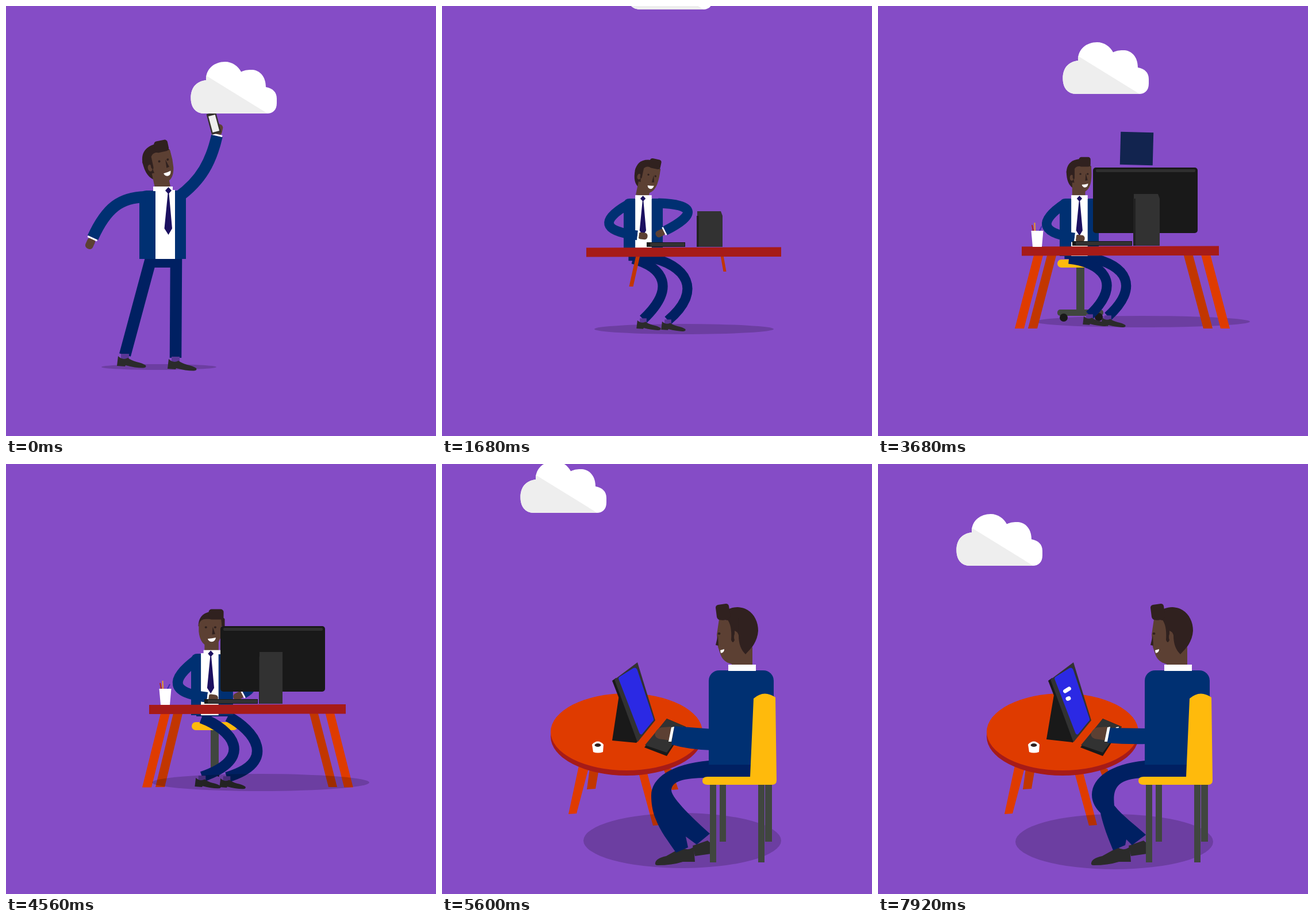
Recreate the animation shown at these times as an HTML page. Size 748 px wide and 748 px high, loop 8000 ms.

```html
<!DOCTYPE html>
<html lang="en">
<head>
<meta charset="utf-8">
<title>Work anywhere</title>
<style>
html, body { margin: 0; height: 100%; overflow: hidden; background: #854cc6; }
svg { display: block; width: 100vw; height: 100vh; }
.coat { fill: #003072; }
.trouser { fill: #002062; }
.skin { fill: #5c4033; }
.hair { fill: #30211f; }
.white { fill: #fff; }
.tie { fill: #1b1060; }
.shoe { fill: #2b2b2b; }
.sock { fill: #5a3797; }
.arm { fill: none; stroke: #003072; }
.leg { fill: none; stroke: #002062; }
.shade { fill: #000; fill-opacity: .19; }
.orange { fill: #df3b00; }
.rust { fill: #c23600; }
.red { fill: #a61b18; }
.yellow { fill: #ffba0c; }
.metal { fill: #40463f; }
.ink { fill: #191919; }
.dark { fill: #323232; }
</style>
</head>
<body>
<svg viewBox="0 0 748 748">
  <defs>
    <g id="shoe">
      <rect class="sock" x="-7" y="-2" width="14" height="11"/>
      <path class="shoe" d="M-12,2L-14,19L0,20L1,18Q20,23 32,22.500Q38,22 36,18Q30,14 20,12Q10,9 5,5Q-4,10 -12,2Z"/>
    </g>
    <g id="hand">
      <rect class="skin" x="1" y="-7" width="20" height="14" rx="6"/>
      <rect class="white" x="0" y="-9" width="3" height="18"/>
    </g>
  </defs>

  <ellipse id="shadeBack" class="shade"/>

  <g id="stool">
    <rect class="metal" x="33" y="10" width="14" height="80"/>
    <g id="stoolBase">
      <rect class="metal" x="-40" y="0" width="80" height="11" rx="5"/>
      <circle class="ink" cx="-29" cy="14" r="7"/>
      <circle class="ink" cx="32" cy="13" r="7"/>
    </g>
    <rect class="yellow" width="80" height="14" rx="7"/>
  </g>

  <g id="front">
    <path id="legR" class="leg"/><use id="shoeR" href="#shoe"/>
    <path id="legL" class="leg"/><use id="shoeL" href="#shoe"/>
    <g id="head">
      <path id="nape" class="hair" d="M-26,-46C-26,-25 -20,-16 -13,-11L2,-18V-46Z"/>
      <path class="hair" d="M-26,-42C-26,-58 -18,-70 4,-71H12L25,-56V-42Z"/>
      <rect class="skin" x="-14" y="-22" width="27" height="28"/>
      <g id="face">
        <path class="skin" d="M-11,-46Q-8,-57 2,-56H25Q27,-40 25,-25Q22,-6 9,-2Q-9,-4 -11,-32Z"/>
        <g id="ear">
          <ellipse class="skin" cx="-15" cy="-32" rx="4" ry="6"/>
          <path class="hair" d="M-13,-50h4v18q-1,6 -4,0z"/>
        </g>
        <g id="features">
          <path class="hair" d="M14,-41L13,-26L18,-27Z"/>
          <circle class="hair" cx="3" cy="-40" r="2"/>
          <circle class="hair" cx="18" cy="-40" r="2"/>
          <path class="white" d="M6,-18Q13,-18 19,-20Q18,-12 12,-12Q7,-13 6,-18Z"/>
        </g>
      </g>
      <rect id="quiff" class="hair" x="0" y="-75" width="24" height="20" rx="5"/>
    </g>
    <g id="torso">
      <rect id="waist" class="trouser" x="10" y="115" width="64" rx="1"/>
      <path class="coat" d="M0,119V10Q2,0 12,0H81V119Z"/>
      <rect id="shirt" class="white" y="-1" width="34" height="120"/>
      <rect class="white" x="24" y="-7" width="34" height="8"/>
      <path id="tie" class="tie" d="M0,-6L5.500,0L1,5L6.500,66L0,77L-7,66L-1,5L-5.500,0Z"/>
    </g>
    <path id="armR" class="arm"/><use id="handR" href="#hand"/>
    <path id="armL" class="arm"/><use id="handL" href="#hand"/>
  </g>

  <g id="phone">
    <rect x="-8.500" y="-18.500" width="17" height="37" rx="1" fill="#35312f"/>
    <rect x="-6" y="-14" width="12" height="29" fill="#eee"/>
  </g>

  <g id="cloud">
    <path class="white" d="M24,90C8,90 .5,78 .5,63C.5,45 10,34 27,32C26,12 42,0 60,0C73,0 83,8 88,17.500C96,14 100,14 108,14C120,15 131,25 131,44C143,46 150,53 150,64V72C150,84 143,90 133,90Z"/>
    <path fill="#eee" d="M27,24L134,90H24C8,90 .5,78 .5,63C.5,45 10,34 27,32Z"/>
  </g>

  <rect id="tile" x="-.5" y="-.5" width="1" height="1"/>

  <g id="desk">
    <path id="deskBL" class="rust"/><path id="deskBR" class="rust"/>
    <path id="deskFL" class="orange"/><path id="deskFR" class="orange"/>
    <path id="deskTop" class="red"/>
    <g id="cup">
      <path d="M-7,-28L-9,-38" stroke="#b3231b" stroke-width="2"/>
      <path d="M-4,-28L-4.500,-42" stroke="#f0a020" stroke-width="2"/>
      <path d="M4,-28L8,-36" stroke="#3c2fb0" stroke-width="2"/>
      <path class="white" d="M-10.500,-28H10.500L8,0H-8Z"/>
    </g>
  </g>
  <g id="monitor">
    <g id="screen">
      <rect class="ink" x="-91" y="-57" width="182" height="114" rx="5"/>
      <rect x="-86" y="-54" width="173" height="5" rx="2" fill="#2f2f2f"/>
    </g>
    <path id="stand" class="dark"/><path id="standEdge" fill="#222"/>
    <path id="keys" class="ink"/><path id="keysTop" class="dark"/>
  </g>

  <g id="tableLegs">
    <path class="rust" d="M257,530H273L267,565L252,566Z"/>
    <path class="rust" d="M385,530H399L411,566L400,567Z"/>
    <path class="orange" d="M238,525H256L234,608L220,609Z"/>
    <path class="orange" d="M340,530H355L381,628L367,629Z"/>
  </g>
  <ellipse id="shadeTop" class="shade"/>
  <g id="table">
    <ellipse class="red" cx="321" cy="474" rx="132" ry="68"/>
    <ellipse class="orange" cx="321" cy="466" rx="132" ry="67"/>
  </g>
  <g id="things">
    <path class="white" d="M261,488Q271,477 281,488L280,501Q271,504 263,501Z"/>
    <ellipse class="hair" cx="271" cy="489" rx="5.500" ry="3"/>
    <path class="ink" d="M352,493L391,443L424,457L391,508Z"/>
    <path class="dark" d="M353,489L391,443L424,457L391,502Z"/>
    <path id="prop" class="ink"/>
    <path class="ink" d="M296,377L303,372L344,478L338,485Z"/>
    <path class="dark" d="M300,375L340,345L371,446L340,484Z"/>
    <path d="M309,370L333,355Q338,353 340,359L368,443Q369,446 366,448L348,470Q345,472 343,467L308,376Q306,372 309,370Z" fill="#2b29e4"/>
    <rect id="lineA" class="white" x="-7.500" y="-3.500" width="15" height="7" rx="3.500"/>
    <rect id="lineB" class="white" x="-4.500" y="-3.500" width="9" height="7" rx="3.500"/>
  </g>

  <g id="side">
    <path class="shoe" d="M436,664L462,655L468,660V678L440,682Z"/>
    <path class="shoe" d="M371,694Q372,686 390,682L417,667Q427,674 438,666L440,692H419Q400,698 375,698Q370,698 371,694Z"/>
    <path id="sideLeg" class="trouser"/>
    <rect class="coat" x="464" y="359" width="113" height="164" rx="18"/>
    <rect class="coat" x="464" y="480" width="80" height="43"/>
    <g id="sideArm">
      <path class="white" d="M414,458L419,457L417,464H412Z"/>
      <path class="skin" d="M371,467Q376,458 384,458L399,457L397,481L384,479Q368,478 371,467Z"/>
      <path id="sleeve" class="coat"/>
      <path class="white" d="M399,458L404,457L399,483L394,483Z"/>
    </g>
    <g id="sideHead">
      <path class="hair" d="M490,258Q500,249 514,249C538,250 550,270 550,290C549,308 538,322 528,332L500,300Z"/>
      <path class="skin" d="M482,270L478,297L480,318L484,330Q488,344 504,348V352H540V318L528,331Q516,320 516,298L508,280L498,272Z"/>
      <path class="hair" d="M494,268Q505,278 503,306Q506,314 509,306V290L516,294L515,268Z"/>
      <ellipse class="skin" cx="512" cy="301" rx="4" ry="8"/>
      <path class="hair" d="M480,298L476,315L481,316Z"/>
      <ellipse class="hair" cx="482" cy="295" rx="2.500" ry="2"/>
      <path class="white" d="M484,324L491,322Q491,328 485,329Z"/>
      <path class="hair" d="M476,250Q476,246 480,245L494,243Q498,243 499,247L502,266Q494,274 482,271Q479,270 478,266Z"/>
    </g>
    <rect class="white" x="498" y="349" width="48" height="11"/>
  </g>
  <g id="chair">
    <path class="metal" d="M483,555H494V657H483ZM562,555H574V657H562ZM466,555H477V693H466ZM550,555H561V693H550Z"/>
    <path class="yellow" d="M542,408Q560,392 580,406L582,550Q582,558 574,558H462Q453,558 453,551Q453,544 462,544H536Z"/>
  </g>
</svg>
<script>
const LOOP = 8000, STEP = 80;
const el = {};
document.querySelectorAll('svg [id]').forEach(n => el[n.id] = n);

const NUM = /-?\d*\.?\d+/g;
const nums = s => s.match(NUM).map(Number);
const smooth = k => k * k * (3 - 2 * k);
const speedUp = k => k * k;
const slowDown = k => 1 - (1 - k) * (1 - k);
const clamp = k => Math.max(0, Math.min(1, k));
const pop = (t, a, b) => smooth(clamp((t - a) / (b - a)));

function mix(a, b, k) {
  const to = nums(b);
  let i = 0;
  return a.replace(NUM, n => (+n + (to[i++] - n) * k).toFixed(2));
}
// rows: [time, values, easing into this row]
function at(t, rows) {
  const i = rows.findIndex(r => r[0] > t);
  if (i < 0) return rows[rows.length - 1][1];
  if (i === 0) return rows[0][1];
  const [t0, a] = rows[i - 1], [t1, b, ease = smooth] = rows[i];
  return mix(a, b, ease((t - t0) / (t1 - t0)));
}
const vals = (t, rows) => nums(at(t, rows));
const set = (id, attrs) => { for (const k in attrs) el[id].setAttribute(k, attrs[k]); };
const move = (id, x, y, r = 0, sx = 1, sy = sx) =>
  set(id, { transform: `translate(${x} ${y}) rotate(${r}) scale(${sx} ${sy})` });
const show = (id, on) => { el[id].style.display = on ? '' : 'none'; };
const grow = (id, x, y, k) => {
  show(id, k > 0);
  set(id, { transform: `translate(${x} ${y}) scale(${k}) translate(${-x} ${-y})` });
};
const box = (x1, y1, x2, y2) => `M${x1},${y1}H${x2}V${y2}H${x1}Z`;

// body: scale x y headTilt headTurn tie shirt waist shoeDir
const reach = {
  body: '1 232 321 -12 0 50.5 28 19 1',
  armL: 'M242,332C200,333 175,350 151,403', armR: 'M300,332C340,303 357,270 367,226',
  legL: 'M252,440C237,496 222,551 207,607', legR: 'M296,440C296,497 295,555 295,612'
};
const lean = {
  body: '1 232 321 0 0 48 27 19 1',
  armL: 'M246,331C222,365 218,400 267,440', armR: 'M300,330C350,326 378,310 394,260',
  legL: 'M253,440C256,500 258,540 196,595', legR: 'M300,440C345,475 365,520 336,595'
};
const sit = {
  body: '.84 316 335 12 0 40 24 14 1',
  armL: 'M324,345C276,372 278,392 340,399', armR: 'M376,343C440,345 445,362 388,391',
  legL: 'M332,440C385,455 408,490 350,545', legR: 'M360,437C425,450 455,495 393,547'
};
const type = {
  body: '.84 316 335 0 0 41 24 10 1',
  armL: 'M326,343C282,372 278,395 342,403', armR: 'M374,343C400,345 402,355 396,374',
  legL: 'M332,440C385,445 430,480 368,538', legR: 'M365,437C435,450 455,490 400,540'
};
const turn = {
  body: '.9 322 330 0 1 38 19 6 1',
  armL: 'M332,340C284,376 286,398 350,406', armR: 'M390,340C430,360 440,385 413,399',
  legL: 'M340,442C394,462 434,512 341,544', legR: 'M386,439C432,463 474,518 384,545'
};
const spin = {
  body: '1.4 464 359 -6 1.3 30 10 8 -1',
  armL: 'M480,380C440,420 430,475 400,473', armR: 'M560,380C590,420 560,470 430,470',
  legL: 'M490,531C380,535 350,560 410,665', legR: 'M530,531C420,535 400,570 450,650'
};
const poses = [[0, reach], [760, lean], [1120, lean], [1640, sit], [1700, sit],
  [2300, type], [4400, type], [4560, turn, speedUp], [5240, spin, slowDown]];
const part = (t, name) => at(t, poses.map(([time, p, ease]) => [time, p[name], ease]));

const cloudPath = [[0, '321 97'], [760, '321 70'], [1000, '321 70'], [1680, '321 -84', speedUp],
  [1760, '321 -96'], [2040, '321 -96'], [2560, '321 63', slowDown], [4000, '321 63'],
  [4400, '321 -96', speedUp], [4480, '136 -96'], [5240, '136 -96'], [5600, '136 -5', speedUp],
  [6120, '136 97', slowDown], [7040, '136 91'], [7920, '136 87']];
const tilePath = [[400, '396 110 0 0'], [760, '389 96.5 80 0'], [900, '389 96.5 80 0'],
  [1140, '390 232 0 0'], [2760, '396 115 0 0'], [3080, '396 115 79 0'], [3300, '396 115 79 0'],
  [3680, '450 248 57 1.5', speedUp], [3920, '465 330 20 0', slowDown], [4000, '465 340 0 0']];
const shadePath = [[0, '266 628 100 5'], [760, '268 610 102 6'], [1120, '268 610 102 6'],
  [1640, '421 562 156 9'], [1700, '421 562 156 9'], [2300, '460 549 187 10'],
  [4400, '460 549 187 10'], [4560, '443 554 189 15', speedUp], [4960, '490 610 190 36'],
  [5280, '439 652 172 48'], [5600, '418 655 172 48'], [6200, '411 659 172 48'], [7920, '411 657 172 48']];

// each desk leg: top x, foot x, foot y, width at three stages
const deskLegs = {
  deskFL: ['330 330 434 0', '279 246 561 16', '277 245 562.5 16'],
  deskBL: ['341 329 488 7', '302 269 561 16', '299 268 562 16'],
  deskBR: ['487 492 462 5', '540 574 561 16', '535.5 568.5 562 15'],
  deskFR: ['490 490 434 0', '570.5 604 561 16', '563.5 596 562.5 15.5']
};

function drawLimb(t, id, tip, width, s, dir) {
  const d = part(t, id), p = nums(d);
  set(id, { d, 'stroke-width': width * s });
  const a = Math.atan2(p[7] - p[5], p[6] - p[4]) * 180 / Math.PI;
  if (dir) move(tip, p[6], p[7], 0, s * dir, s);
  else move(tip, p[6], p[7], a, s);
}

function drawFront(t) {
  const [s, x, y, tilt, look, tie, shirt, waist, dir] = nums(part(t, 'body'));
  const nod = t > 2480 && t < 4280 ? 2 * Math.sin((t - 3680) / 400 * 2 * Math.PI) : 0;
  move('torso', x, y, 0, s);
  move('head', x + 40 * s, y - 11 * s, tilt + nod, s);
  move('nape', 14 * look, 0);
  move('face', -12 * look, 0, 0, 1 + .2 * look, 1);
  move('features', -2.5 * look, 0);
  move('quiff', -6 * look, 0, 0, 1 + .2 * look, 1);
  set('ear', { opacity: clamp(1 - look) });
  move('tie', tie, 0);
  set('shirt', { x: shirt });
  set('waist', { height: waist });
  drawLimb(t, 'armL', 'handL', 20, s);
  drawLimb(t, 'armR', 'handR', 20, s);
  drawLimb(t, 'legL', 'shoeL', 20.5, s, dir);
  drawLimb(t, 'legR', 'shoeR', 20.5, s, dir);
  const [px, py, pr, ps] = vals(t, [[0, '361.5 204 -15 1'], [760, '390 234 -5 1'],
    [1120, '390 234 -5 1'], [1320, '395 250 0 0']]);
  move('phone', px, py, pr, ps);
  return [s / 1.4, x, y];
}

function drawDesk(t) {
  for (const id in deskLegs) {
    const [a, b, c] = deskLegs[id];
    const hid = nums(a)[0] + ' ' + nums(a)[0] + ' 434 0';
    const [top, foot, y, w] = vals(t, [[1560, hid], [1680, a, speedUp], [2160, b, slowDown],
      [4400, b], [4560, c, speedUp], [4840, hid]]);
    const h = w / 2;
    set(id, { d: `M${top - h},434H${top + h}L${foot + h},${y}H${foot - h}Z` });
  }
  const [x1, x2, y] = vals(t, [[1350, '420 420 420'], [1640, '251 590 420'], [1700, '251 590 420'],
    [2160, '250 593 418'], [4400, '250 593 418'], [4560, '249 591 418.5'], [4900, '420 420 420', speedUp]]);
  set('deskTop', { d: x2 - x1 > 1 ? `M${x1},${y + .5}L${x2},${y - .5}V${y + 16}L${x1},${y + 16.5}Z` : 'M0,0' });
  const cup = pop(t, 1960, 2240) * (1 - pop(t, 4600, 4760));
  move('cup', 277, 419, 0, cup);

  const [sx1, sx2, top, bot] = vals(t, [[1560, '444 488 419 419'], [1680, '444 488 357 419'],
    [2000, '445 490 327 417'], [4400, '445 490 327 417'], [4560, '441 481 327 417']]);
  const cut = t < 4480 ? 3 : 0, chop = Math.min(8, bot - top);
  set('stand', { d: `M${sx1},${top}H${sx2 - cut}L${sx2},${top + chop}V${bot}H${sx1}Z` });
  set('standEdge', { d: bot > top ? box(sx1 - 1, Math.min(top + chop, bot), sx1 + cut, bot) : 'M0,0' });
  const [k1, k2, ky] = vals(t, [[1480, '390 390 411'], [1660, '356 423 411'], [1700, '356 423 411'],
    [2100, '338 442 409'], [4400, '338 442 409'], [4560, '345 438 409']]);
  const wide = k2 > k1;
  set('keys', { d: wide ? box(k1, ky, k2, ky + 8) : 'M0,0' });
  set('keysTop', { d: wide ? box(k1 + 6, ky + 1, k2 - 1, ky + 7) : 'M0,0' });
  const [mx, my] = vals(t, [[4400, '465 338'], [4560, '464 339']]);
  move('screen', mx, my, 0, pop(t, 1880, 2200));
  const [lift] = vals(t, [[4600, '0'], [4920, '-440', speedUp]]);
  move('monitor', 0, lift);
  show('monitor', t < 4920);

  const [cx, cy, base, drop] = vals(t, [[4400, '312 441 1 87'], [4560, '323 449 .2 91']]);
  const k = pop(t, 1900, 2240) * (1 - pop(t, 4600, 4800));
  set('stool', { transform: `translate(${cx + 40} ${cy + 7}) scale(${k}) translate(-40 -7)` });
  move('stoolBase', 40, drop, 0, base);
}

function drawCafe(t, [k, x, y]) {
  const typing = t > 5600 ? 1.5 * Math.sin((t - 5600) / 290 * 2 * Math.PI) : 0;
  const blend = (a, b) => at(t, [[5680, a], [6320, b]]);
  grow('tableLegs', 321, 500, pop(t, 4720, 5120));
  grow('table', 321, 470, pop(t, 4720, 5080));
  grow('things', 330, 480, pop(t, 5000, 5280));
  grow('chair', 520, 693, pop(t, 4860, 5240));
  set('prop', { d: blend('M308,402L296,481L338,485L345,470Z', 'M306,402L293,479L338,484L345,470Z') });
  move('lineA', 329, 393, -32, pop(t, 6800, 7000));
  move('lineB', 331, 408, -20, pop(t, 7120, 7320));
  move('side', x - 464 * k, y - 359 * k, 0, k);
  set('sideLeg', { d: blend(
    'M540,516H464C400,522 364,545 364,577C364,590 366,603 371,616C380,640 393,655 407,676L428,667L424,648L443,662L466,643C440,620 400,582 399,568C399,552 420,546 460,546H540Z',
    'M540,516H464C405,522 373,545 372,575C372,590 380,600 387,607C392,630 400,650 409,672L430,663L432,653L442,663L466,645C450,630 425,612 411,594C408,565 415,548 460,546H540Z') });
  set('sleeve', { d: blend('M404,456L470,461V498Q430,497 399,488Z', 'M403,459L470,460V487Q430,488 399,485Z') });
  move('sideArm', 0, typing);
  const [hx] = nums(blend('0', '-2'));
  move('sideHead', hx, 0);
}

function draw(t) {
  const [cx, cy, rx, ry] = vals(t, shadePath);
  const over = t >= 4440;
  set(over ? 'shadeTop' : 'shadeBack', { cx, cy, rx, ry });
  show('shadeTop', over);
  show('shadeBack', !over);

  const [x, y] = vals(t, cloudPath);
  move('cloud', x, y);
  const [ix, iy, size, rot] = vals(t, tilePath);
  move('tile', ix, iy, rot, size);
  set('tile', { fill: t < 2000 ? '#c8161e' : '#12244f' });

  const frame = drawFront(t);
  drawDesk(t);
  drawCafe(t, frame);
  const seated = t >= 4880;
  show('front', !seated);
  show('side', seated);
}

function tick() {
  const t = performance.now() % LOOP;
  draw(Math.floor(t / STEP) * STEP);
  requestAnimationFrame(tick);
}
tick();
</script>
</body>
</html>
```
